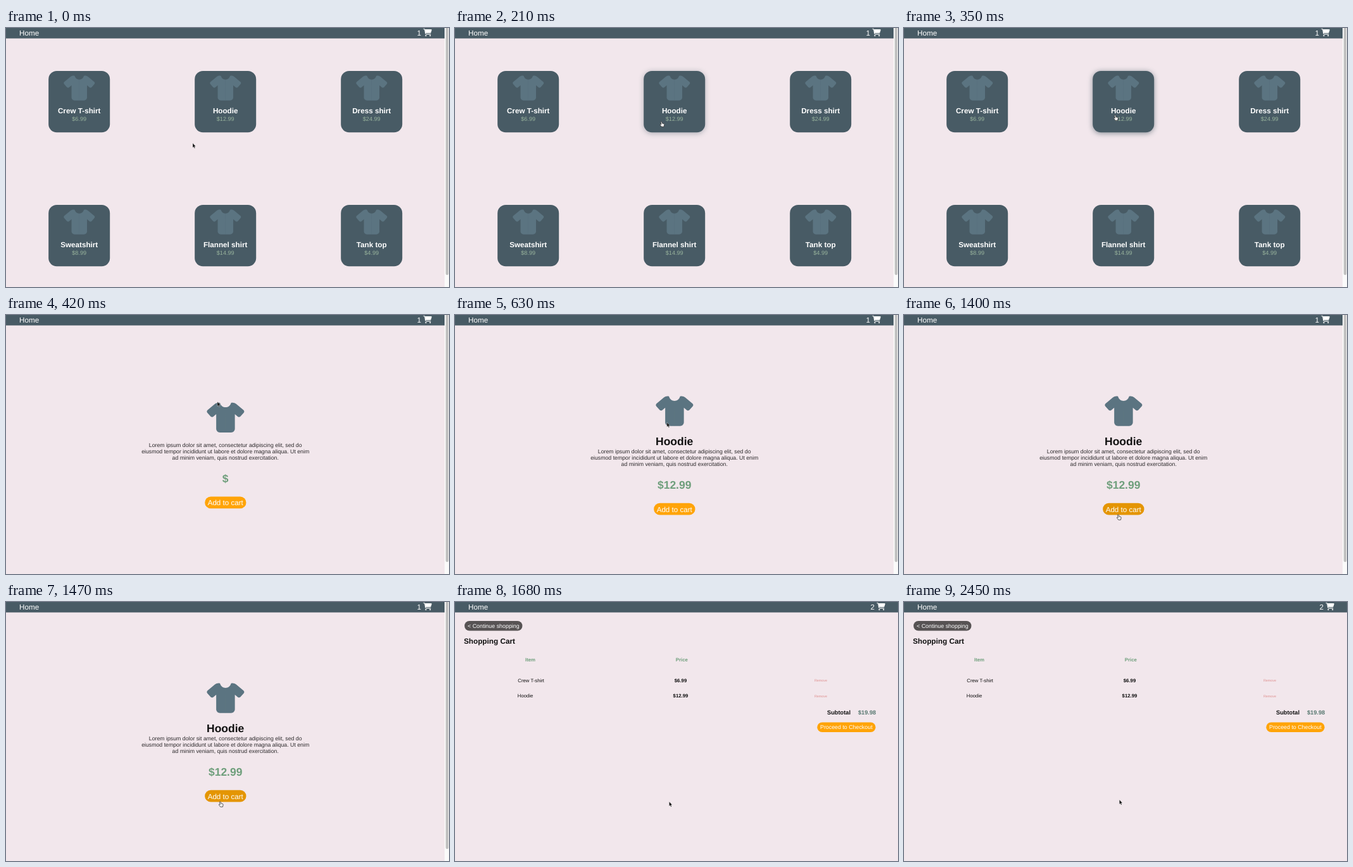
These frames come from a looping animation (700x410 px, 2.52 s). An HTML page:

```html
<!DOCTYPE html>
<html lang="en">
<head>
<meta charset="utf-8">
<title>Shop demo</title>
<style>
html, body { margin: 0; width: 100%; height: 100%; overflow: hidden; background: #f2e7ec; }
svg { display: block; font-family: "Liberation Sans", Arial, sans-serif; text-rendering: geometricPrecision; }
.b { font-weight: bold; }
.c { text-anchor: middle; }
</style>
</head>
<body>
<svg id="stage" width="700" height="410" viewBox="0 0 700 410">
  <defs>
    <path id="half" d="M321 80H320c-42.900 0-79.200-28.100-91.500-66.800C226.100 5.700 219.600 0 211.800 0h-12.600C176.700 0 155 7.900 137.700 22.300L11.500 127.400C4.900 132.900 .8 140.900 .1 149.500s2.100 17.100 7.800 23.600l56 64c11.400 13.100 31.200 14.600 44.600 3.500L160 197.700V448c0 35.300 28.700 64 64 64H321z"/>
    <g id="shirt" fill="#5b7481">
      <use href="#half"/>
      <use href="#half" transform="matrix(-1 0 0 1 640 0)"/>
    </g>
    <g id="trolley" fill="#fff">
      <path d="M24 24H70q24 0 30 26l53 282q6 28 46 28H488" fill="none" stroke="#fff" stroke-width="48" stroke-linecap="round"/>
      <path d="M110 32H531q48 0 38 50l-41 153q-12 53-70 53H158z"/>
      <circle cx="176" cy="464" r="48"/>
      <circle cx="464" cy="464" r="48"/>
    </g>
    <filter id="blur" x="-30%" y="-30%" width="160%" height="160%">
      <feGaussianBlur stdDeviation="4"/>
    </filter>
  </defs>
  <rect width="700" height="410" fill="#f2e7ec"/>
  <rect width="700" height="16.500" fill="#485b65"/>
  <text x="21" y="11.500" font-size="11.700" fill="#fff">Home</text>
  <g id="basket">
    <text id="count" x="649.500" y="11.500" font-size="11.700" fill="#fff">1</text>
    <use href="#trolley" transform="translate(659.300 1.200) scale(.0235)"/>
  </g>
  <g id="scrollbar">
    <rect x="693" width="7" height="410" fill="#fafafa"/>
    <rect x="694.800" y="-4" width="4.400" height="395" rx="2.200" fill="#c1c1c1"/>
  </g>
  <g id="list">
    <rect id="shadow" x="298" y="69" width="97" height="98" rx="13" fill="#485b65" filter="url(#blur)"/>
  </g>
  <g id="product"></g>
  <g id="cart"></g>
  <g id="cursor">
    <path id="arrow" d="M0 0V7.200L1.600 5.800L2.700 8.300L3.900 7.800L2.800 5.300H4.900z" fill="#111" stroke="#fff" stroke-width=".5" stroke-opacity=".7"/>
    <path id="hand" d="M-1 .6Q0-.6 .8 .6L1.500 3L4.200 3.600Q5 4 4.600 5.800L4 8.300H.4L-2 5.200Q-2.200 4 -.8 4.300L0 4.700z" fill="#f4f4f4" stroke="#333" stroke-width=".8" stroke-linejoin="round"/>
  </g>
</svg>
<script>
const LOOP = 2520, STEP = 70;
const GREEN = '#6f9f7c', ORANGE = '#ffa408', INK = '#111';
const $ = id => document.getElementById(id);

function add(parent, tag, attrs, content = '') {
  const node = document.createElementNS('http://www.w3.org/2000/svg', tag);
  for (const key in attrs) node.setAttribute(key, attrs[key]);
  node.textContent = content;
  parent.append(node);
  return node;
}
const text = (parent, content, x, y, size, fill, cls = '') =>
  add(parent, 'text', { x, y, 'font-size': size, fill, class: cls }, content);
const pill = (parent, x, y, width, height, fill) =>
  add(parent, 'rect', { x, y, width, height, rx: height / 2, fill });
const shirt = (parent, x, y, width) =>
  add(parent, 'use', { href: '#shirt', transform: `translate(${x} ${y}) scale(${width / 640})` });
const show = (node, on) => node.setAttribute('display', on ? 'inline' : 'none');

// Product list
const goods = [
  ['Crew T-shirt', '$6.99'], ['Hoodie', '$12.99'], ['Dress shirt', '$24.99'],
  ['Sweatshirt', '$8.99'], ['Flannel shirt', '$14.99'], ['Tank top', '$4.99']
];
goods.forEach(([name, price], i) => {
  const x = 115.7 + i % 3 * 231, y = 68 + Math.floor(i / 3) * 212;
  add($('list'), 'rect', { x: x - 48.5, y, width: 97, height: 97.3, rx: 13, fill: '#485b65' });
  shirt($('list'), x - 24.4, y + 7.5, 49);
  text($('list'), name, x, y + 67.2, 11.7, '#fff', 'b c');
  text($('list'), price, x, y + 79.4, 9.15, '#98b39c', 'c');
});

// Product page: the details push the halves apart once loaded
const mid = 346.7;
const upper = add($('product'), 'g', {}), lower = add($('product'), 'g', {});
shirt(upper, 317.4, 128.5, 59);
const title = text(upper, 'Hoodie', mid, 206, 17.5, INK, 'b c');
[
  'Lorem ipsum dolor sit amet, consectetur adipiscing elit, sed do',
  'eiusmod tempor incididunt ut labore et dolore magna aliqua. Ut enim',
  'ad minim veniam, quis nostrud exercitation.'
].forEach((line, i) => text(lower, line, mid, 219 + i * 10.2, 8.75, '#2c292b', 'c'));
const price = text(lower, '$12.99', mid, 275.4, 17.5, GREEN, 'b c');
const button = pill(lower, 314.2, 297.8, 65.3, 18.7, ORANGE);
text(lower, 'Add to cart', mid, 311.5, 11.6, '#fff', 'c');

// Cart page
const cart = $('cart');
pill(cart, 15, 30, 91.5, 15.4, '#575354');
text(cart, '< Continue shopping', 20, 40.9, 8.9, '#fff');
text(cart, 'Shopping Cart', 14, 66.4, 11.75, INK, 'b');
text(cart, 'Item', 119, 93.8, 7.8, GREEN, 'b c');
text(cart, 'Price', 358.3, 93.8, 7.8, GREEN, 'b c');
goods.slice(0, 2).forEach(([name, cost], i) => {
  const y = 127 + i * 24.2;
  text(cart, name, 99.3 - i * .5, y, 7.75, INK);
  text(cart, cost, 356.5, y, 7.8, INK, 'b c');
  text(cart, 'Remove', 578, y - .7, 5.4, '#df908f', 'c');
});
text(cart, 'Subtotal', 588, 178.4, 9.25, INK, 'b');
text(cart, '$19.98', 637, 178.4, 9.2, '#587871', 'b');
pill(cart, 572.3, 190.5, 92.3, 15.5, ORANGE);
text(cart, 'Proceed to Checkout', 577, 201.4, 8.85, '#fff');

// Pointer path: time, x, y
const path = [
  [0, 295, 182.3], [70, 300, 177], [210, 326, 148], [280, 332, 140],
  [350, 333.5, 138], [420, 334, 137.3], [560, 334.3, 146], [700, 335.5, 194],
  [840, 337, 254], [980, 338, 290], [1050, 338, 296.7], [1190, 338, 306],
  [1330, 338.2, 315], [1400, 338.4, 316], [2449, 338.4, 316], [2450, 340.3, 313], [LOOP, 340.3, 313]
];
function pointAt(t) {
  const i = path.findIndex(p => p[0] > t);
  const [t0, x0, y0] = path[i - 1], [t1, x1, y1] = path[i];
  const k = (t - t0) / (t1 - t0);
  return [x0 + (x1 - x0) * k, y0 + (y1 - y0) * k];
}
const ramp = (t, from, to) => Math.min(1, Math.max(0, (t - from) / (to - from)));

function draw(time) {
  const t = Math.floor(time / STEP) * STEP;
  const inCart = t >= 1540, inProduct = t >= 420 && !inCart, loaded = t >= 490;
  show($('list'), t < 420);
  show($('product'), inProduct);
  show(cart, inCart);
  show($('scrollbar'), !inCart);
  $('basket').setAttribute('transform', `translate(${inCart ? 7 : 0} 0)`);
  $('count').textContent = inCart ? 2 : 1;
  $('shadow').setAttribute('opacity', .6 * ramp(t, 70, 280));

  show(title, loaded);
  price.textContent = loaded ? '$12.99' : '$';
  upper.setAttribute('transform', `translate(0 ${loaded ? 0 : 10.2})`);
  lower.setAttribute('transform', `translate(0 ${loaded ? 0 : -10.2})`);
  const dark = ramp(t, 1050, 1260);
  button.setAttribute('fill', `rgb(${255 - 27 * dark},${164 - 15 * dark},${8 - 6 * dark})`);

  const hand = t >= 140 && t < 420 || t >= 1120 && t < 1680;
  show($('hand'), hand);
  show($('arrow'), !hand);
  $('cursor').setAttribute('transform', `translate(${pointAt(t)})`);
}

const start = performance.now();
function tick() {
  draw((performance.now() - start) % LOOP);
  requestAnimationFrame(tick);
}
tick();
</script>
</body>
</html>
```
